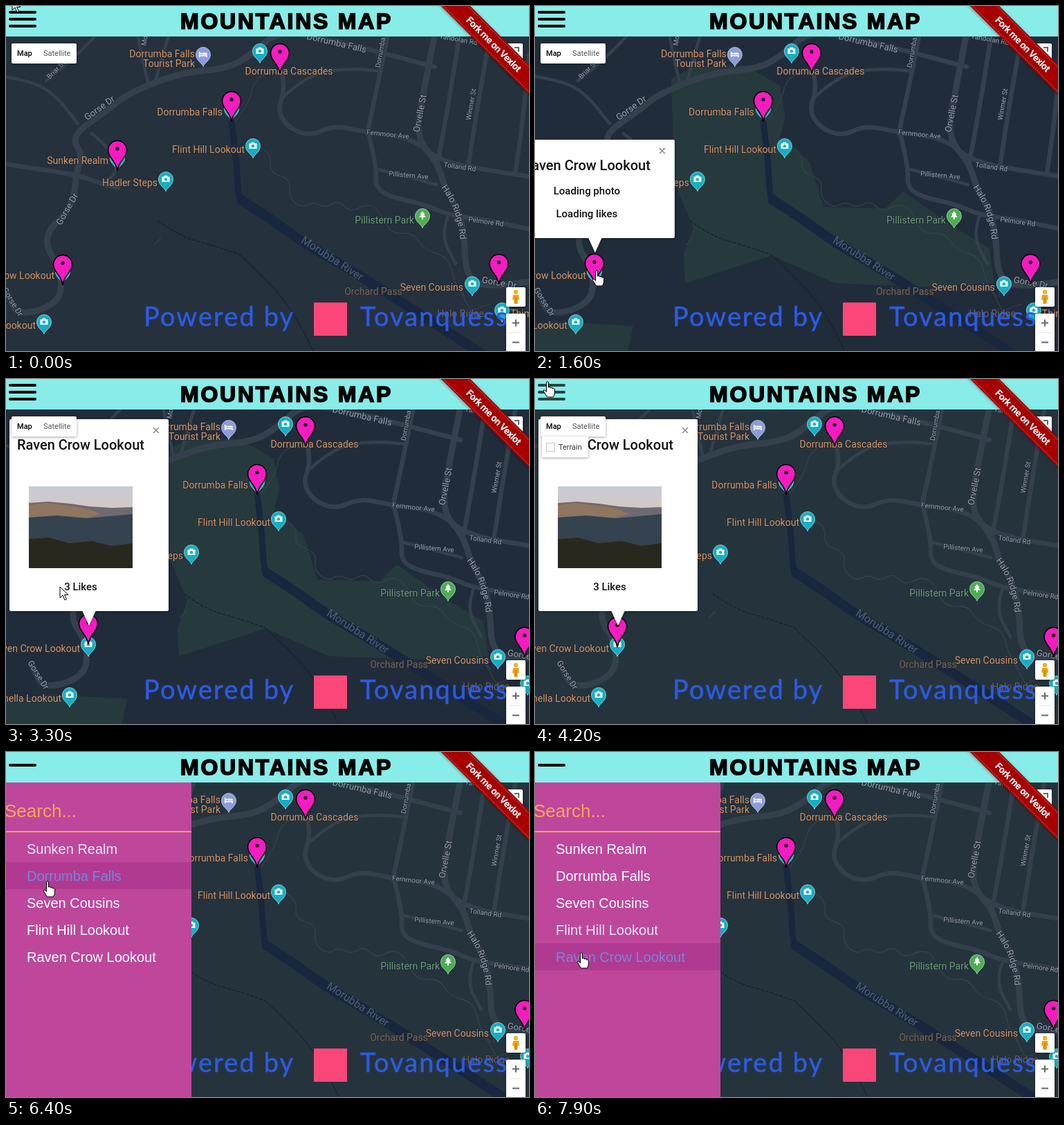
Write an HTML page that moves like this. It is 756 px wide and 498 px high and loops after 8 s.

```html
<!DOCTYPE html>
<html lang="en">
<head>
<meta charset="utf-8">
<title>Mountains Map</title>
<style>
  html, body { margin: 0; width: 100%; height: 100%; overflow: hidden; background: #25313d; }
  svg { display: block; width: 756px; height: 498px; font-family: Roboto, "Noto Sans", sans-serif; }
  .arial { font-family: "Liberation Sans", Arial, sans-serif; }
  .road { fill: none; stroke: #35404d; stroke-linecap: round; stroke-linejoin: round; }
  .halo text { paint-order: stroke; stroke: #222c39; stroke-width: 2px; stroke-linejoin: round; }
  .shadow { filter: drop-shadow(0 1px 2px rgba(0, 0, 0, .35)); }
</style>
</head>
<body>
<svg id="stage" viewBox="0 0 756 498"></svg>
<script>
const LOOP = 8000, STEP = 100, PAN = 37;
const POI = '#d59563', TEAL = '#12b0c6', PINK = '#f41cc0';

const clamp = v => Math.max(0, Math.min(1, v));
const ease = v => { v = clamp(v); return v * v * (3 - 2 * v); };

// Smooth path through "x,y x,y ..." points.
function curve(str) {
  const p = str.split(' ').map(s => s.split(',').map(Number));
  let d = `M${p[0]}`;
  for (let i = 1; i < p.length - 1; i++) {
    const mid = [0, 1].map(k => (p[i][k] + p[i + 1][k]) / 2);
    d += `Q${p[i]} ${mid}`;
  }
  return d + `L${p[p.length - 1]}`;
}

const text = (s, x, y, size, fill, extra = '') =>
  `<text x="${x}" y="${y}" font-size="${size}" fill="${fill}" ${extra}>${s}</text>`;
const END = 'text-anchor="end"', MIDDLE = 'text-anchor="middle"';
const box = (x, y, w, h, fill, extra = '') =>
  `<rect x="${x}" y="${y}" width="${w}" height="${h}" fill="${fill}" ${extra}/>`;
const street = (s, x, y, angle, size, fill = '#9aa2ae') =>
  text(s, 0, size * .36, size, fill, `${MIDDLE} transform="translate(${x} ${y}) rotate(${angle})"`);
const roads = (width, list) =>
  list.map(r => `<path class="road" stroke-width="${width}" d="${curve(r)}"/>`).join('');

const GLYPH = {
  camera: c => `<path d="M-5.5-3.5h2.5l1-1.8h4l1 1.8h2.5v7.5h-11z" fill="#fff"/><circle r="2.3" cy=".3" fill="${c}"/>`,
  bed: c => `<path d="M-6-4h1.5v5h10.5v3h-1.5v-1.5h-9V4H-6zM-1-2.5h5q2 0 2 2.8h-7z" fill="#fff"/><circle cx="-2.8" cy="-1.2" r="1.4" fill="#fff"/>`,
  tree: c => `<path d="M0-7L3.6-2H2l3 4H1v3h-2v-3h-4l3-4h-1.6z" fill="#fff"/>`
};
const poi = (x, y, fill = TEAL, glyph = 'camera') =>
  `<g transform="translate(${x} ${y})"><path d="M0 15.500C-1.500 10-10.500 7-10.500-2A10.500 10.500 0 1 1 10.500-2C10.500 7 1.500 10 0 15.500Z"
    fill="${fill}" stroke="#b9d3da" stroke-width=".8"/><g transform="translate(0 -2)">${GLYPH[glyph](fill)}</g></g>`;
const pin = (x, y, id = '') =>
  `<g ${id} transform="translate(${x} ${y})"><path d="M0 0C-2-16-13.500-18-13.500-30A13.500 13.500 0 1 1 13.500-30C13.500-18 2-16 0 0Z"
    fill="${PINK}" stroke="#000" stroke-width="1.600"/><circle cy="-32" r="2.600"/></g>`;

const park = `<g id="park" fill="#263a3d">
  <path d="M193 105L225 88 300 86 350 115 358 160 350 190 393 225 413 290 503 292 528 268 603 320 653 350 660 400 560 405 430 400 338 360 213 400 211 360 225 320 198 255Z"/>
  <path d="M-40 466L23 455 138 462 130 498H-40Z"/></g>`;

const roadLayer =
  roads(9, [
    '0,412 8,430 18,444 50,440 76,424 81,400 76,375 58,348 62,322 84,303 98,278 102,240 110,214 98,196 106,178 148,150 168,132 210,112 258,96 320,90 352,72 384,44',
    '620,40 604,120 592,190 624,226 634,262 656,300 663,340 665,388 690,406 756,398'
  ]) +
  roads(6.5, [
    '0,228 50,236 104,244 142,258 162,262',
    '352,72 380,40 440,42 530,64 620,88',
    '398,92 404,120 392,150 408,176 440,188 474,172 520,182 586,190 628,224 690,236 756,246',
    '524,184 536,232 534,262 556,276 604,286 640,302 690,308 756,322',
    '700,40 684,130 668,232', '656,40 640,140 624,226', '756,70 748,160 736,242',
    '552,40 536,120 522,184'
  ]) +
  roads(4.5, [
    '132,40 100,74 58,108', '190,40 198,80 206,114', '-40,96 20,104 66,122 104,170', '236,40 226,72 216,108',
    '124,184 152,206 162,240 140,256', '538,236 580,246 622,258', '402,130 440,96 500,90 540,94',
    '640,300 628,330 650,372'
  ]) +
  `<g fill="none"><g stroke="#33424c" stroke-width="1.300">
    <path d="${curve('330,168 352,140 358,108 384,92')}"/>
    <path d="${curve('368,204 384,214 380,240 412,250 408,276 428,292 444,282 462,292 480,280 498,298 520,286 538,292 556,330 588,326 604,352 640,362 648,400 664,420')}"/>
    <path d="M214 345L224 335M665 345L668 420M650 400L672 440 700 430"/></g>
  <path d="${curve('326,165 329,190 333,225 335,262 338,282')}" stroke="#18273d" stroke-width="9"/>
  <path d="${curve('337,278 378,304 430,342 490,376 550,414 620,458 690,504')}" stroke="#18273d" stroke-width="14"/>
  <path d="${curve('220,310 250,332 300,346 338,359')}" stroke="#17212d" stroke-width="1.400" stroke-dasharray="5 2"/>
  <path d="${curve('338,359 360,380 392,412 420,450 444,498')}" stroke="#19242f" stroke-width="1.300"/></g>`;

const streetLabels = '<g class="halo">' + [
  ['Gorse Dr', 135, 147, -36, 13], ['Gorse Dr', 88, 293, -60, 13], ['Gorse Dr', 10, 427, 58, 12], ['Gorse Dr', 713, 399, 10, 13],
  ['Dorrumba Falls', 478, 53, 13, 13], ['Orvelle St', 598, 155, -79, 13], ['Winmer St', 672, 142, -80, 10],
  ['Dorrumba', 541, 67, -80, 10], ['Fernmoor Ave', 552, 185, 6, 10], ['Pillistern Ave', 582, 244, 5, 10],
  ['Tolland Rd', 656, 232, 8, 10], ['Pelmore Rd', 694, 311, 8, 10], ['Yandolan Rd', 654, 48, 10, 10],
  ['Briar St', 72, 92, -45, 10], ['Mo', 200, 50, -80, 10]
].map(a => street(...a)).join('') +
  `<path id="bend" d="M629 262Q654 294 657 345" fill="none"/>
   <text font-size="13" fill="#9aa2ae"><textPath href="#bend">Halo Ridge Rd</textPath></text></g>` +
  street('Morubba River', 472, 364, 33, 16, '#515f75');

const poiLayer = poi(285, 72, '#8f9bdc', 'bed') + poi(367, 67) + poi(326, 150) + poi(357, 204) + poi(161, 221) +
  poi(231, 252) + poi(602, 305, '#4caf50', 'tree') + poi(674, 403) + poi(82, 385) + poi(55, 458) + poi(717, 441) +
  '<g class="halo">' + [
    ['Dorrumba Falls', 273, 74], ['Tourist Park', 273, 88], ['Dorrumba Falls', 313, 158], ['Flint Hill Lookout', 345, 212],
    ['Sunken Realm', 148, 228], ['Hadler Steps', 219, 260], ['Seven Cousins', 661, 411],
    ['Raven Crow Lookout', 70, 394], ['Manella Lookout', 43, 466]
  ].map(([s, x, y]) => text(s, x, y, 14, POI, END)).join('') +
  text('Dorrumba Cascades', 409, 99, 14, POI, MIDDLE) + text('Pillistern Park', 590, 314, 14, '#6b9a76', END) +
  text('Orchard Pass', 531, 417, 14, '#7b6453', MIDDLE) + text('Halo Ridge', 691, 449, 14, '#75604f', END) +
  text('Thimble', 729, 449, 14, POI) + '</g>';

const pins = pin(396, 98) + pin(326, 167) + pin(161, 238) + pin(712.5, 402) + pin(82, 403, 'id="hopper"');

const brand = `<g font-family="Lato, sans-serif" font-size="38" fill="#2d5be3" stroke="#2d5be3" stroke-width=".5" letter-spacing="2.100">
  <text x="199" y="462">Powered by</text><text x="512" y="462">Tovanquess</text></g>` + box(445, 428, 48, 48, '#fa4778');

const photo = `<defs><linearGradient id="sky" x2="0" y2="1"><stop stop-color="#c6ccd8"/><stop offset="1" stop-color="#d9c6bd"/></linearGradient></defs>
  <g transform="translate(33 155)">${box(0, 0, 150, 40, 'url(#sky)')}
  <path d="M0 24L28 22 60 25 88 29 120 31 150 30V118H0Z" fill="#6e6a70"/>
  <path d="M0 27L24 24 52 27 84 32 104 40 80 46 40 42 0 47Z" fill="#8f7660"/>
  <path d="M0 45L40 42 84 46 150 40V118H0Z" fill="#34434f"/>
  <path d="M0 76L30 74 58 82 92 79 120 86 150 82V118H0Z" fill="#29281e"/></g>`;

const popup = `<g id="popup"><g class="shadow"><rect id="card" x="5" width="230" fill="#fff" rx="2"/>
  <path d="M110 334h20l-10 22z" fill="#fff"/></g>
  <g id="cardTop"><path d="M213 12l8 8m0-8l-8 8" stroke="#8b8b8b" stroke-width="1.600"/>
  ${text('Raven Crow Lookout', 108, 44, 20, '#111', MIDDLE + ' font-weight="500"')}</g>
  <g id="loading" font-weight="500">${text('Loading photo', 108, 272, 15, '#111', MIDDLE)}${text('Loading likes', 108, 305, 15, '#111', MIDDLE)}</g>
  <g id="loaded">${photo}${text('3 Likes', 108, 305, 15, '#111', MIDDLE + ' font-weight="500"')}</g></g>`;

const controls = `<g class="shadow">${box(8, 54, 94, 29, '#fff', 'rx="2"')}${box(719, 54, 28, 28, '#fff', 'rx="2"')}
  ${box(723, 406, 28, 28, '#fff', 'rx="2"')}${box(723, 444, 28, 56, '#fff', 'rx="2"')}</g>` +
  text('Map', 16, 72, 11, '#000', 'font-weight="500"') + text('Satellite', 54, 72, 11, '#565656') +
  `<g id="terrain">${box(10, 83, 67, 30, '#fff', 'class="shadow"')}${box(16.5, 92.5, 12, 12, '#fff', 'stroke="#c6c6c6"')}${text('Terrain', 34, 102, 11, '#333')}</g>
  <path d="M735 60h6v6" fill="none" stroke="#666" stroke-width="2"/>
  <path d="M732 457.500h10M737 452.500v10M732 485.500h10" stroke="#666" stroke-width="2"/>${box(728, 471, 18, 1, '#e6e6e6')}
  <circle cx="737" cy="413" r="3.200" fill="#f5b324"/><path d="M733 417h8l1 7h-2l-.6 6h-4.800l-.6-6h-2z" fill="#f0a30f"/>
  <path d="M737 420v9" stroke="#a86f12"/>`;

const ITEMS = ['Sunken Realm', 'Dorrumba Falls', 'Seven Cousins', 'Flint Hill Lookout', 'Raven Crow Lookout'];
const ROW = 39, LIST_TOP = 121;
const sidebar = `<g id="sidebar" class="arial">${box(0, 44, 268, 454, '#be479b')}
  ${text('Search...', -2, 94, 26, '#fba55b')}${box(0, 114, 268, 2, '#fba55b')}
  ${box(0, 0, 268, ROW, '#b03a92', 'id="hover"')}
  ${ITEMS.map((s, i) => text(s, 30, LIST_TOP + 26 + i * ROW, 20, '#fff', 'class="item"')).join('')}</g>`;

const header = box(0, 0, 756, 44, '#88ece8') +
  `<g id="bars">${[7, 17, 27].map(y => box(4, y, 40, 4, '#000', 'rx="2" class="bar"')).join('')}</g>` +
  `<text class="arial" x="252" y="33" font-size="32" font-weight="bold" letter-spacing="2.750" stroke="#000" stroke-width="1.700">MOUNTAINS MAP</text>`;

const ribbon = `<g transform="translate(705 55) rotate(45)">${box(-130, -15, 260, 30, '#a60000', 'class="shadow"')}
  <path d="M-130-12.500h260M-130 12.500h260" stroke="#d98c8c" stroke-dasharray="2 1.500" stroke-width=".8"/>
  ${text('Fork me on Vexlot', 0, 5, 14, '#fff', MIDDLE + ' font-weight="bold" letter-spacing="-.5"')}</g>`;

const tooltip = `<g id="tooltip">${box(90.5, 407.5, 118, 17, '#fff', 'stroke="#999"')}
  ${text('Raven Crow Lookout', 149.5, 420, 11.5, '#222', MIDDLE + ' font-family="Open Sans, sans-serif"')}</g>`;

const CURSORS = {
  arrow: 'M0 0V16l4-4 3 7 2.500-1-3-6.500h5.500z',
  hand: 'M-1.500.5q1.500-1.500 3 0V8q1.500-1 3 0v1q1.500-1 3 0v1q2-1 3 1v6l-2 5h-9l-5-8q-1-3 1.500-2l2.500 2.500z',
  grab: 'M-3 8L-7 1q-1-2 1-2l2 2-1-6q1-2 2 0l1 4v-6q1.500-1.500 2.500 0v6l1-5q1.500-1 2 0v6l1-4q1.500-1 2 .5l-1.500 6.500-2 5z'
};

document.getElementById('stage').innerHTML = `<rect id="land" width="756" height="498"/>
  <g id="map">${park}${roadLayer}${streetLabels}${poiLayer}${pins}</g>
  ${brand}${popup}${controls}${sidebar}${header}${ribbon}${tooltip}
  <path id="cursor" fill="#fff" stroke="#000" stroke-linejoin="round"/>`;

const ui = {};
document.querySelectorAll('[id]').forEach(e => ui[e.id] = e);
const items = [...document.querySelectorAll('.item')], bars = [...document.querySelectorAll('.bar')];

// Time, x, y and the pointer shape from that time on.
const TRACK = [
  [0, 9, -10, 'arrow'], [200, 18, 60, 'grab'], [700, 89, 382, 'hand'], [1600, 89, 382, 'hand'], [1900, 90, 385, 'grab'],
  [3000, 90, 385, 'grab'], [3200, 82, 330, 'arrow'], [3300, 78, 300, 'arrow'], [3500, 78, 300, 'arrow'],
  [3900, 32, 72, 'hand'], [4200, 18, 4, 'hand'], [4700, 20, 6, 'hand'], [5000, 46, 57, 'hand'], [5400, 52, 108, 'hand'],
  [5700, 55, 132, 'hand'], [6100, 58, 156, 'hand'], [6200, 59, 166, 'hand'], [6400, 60, 187, 'hand'],
  [6800, 62, 210, 'hand'], [7200, 64, 236, 'hand'], [7600, 66, 270, 'hand'], [7700, 67, 280, 'hand'], [7900, 67, 290, 'hand']
];

function pointer(t) {
  let i = TRACK.length - 1;
  while (i > 0 && TRACK[i][0] > t) i--;
  const a = TRACK[i], b = TRACK[i + 1] || a;
  const k = b === a ? 0 : (t - a[0]) / (b[0] - a[0]);
  return { x: a[1] + (b[1] - a[1]) * k, y: a[2] + (b[2] - a[2]) * k, shape: a[3] };
}

const rowAt = t => t < 5000 ? -1 : Math.floor((pointer(t).y - LIST_TOP) / ROW);
const show = (e, on) => e.setAttribute('visibility', on ? 'visible' : 'hidden');
const move = (e, x, y) => e.setAttribute('transform', `translate(${x} ${y})`);
const mix = (a, b, k) => `rgb(${a.map((v, i) => Math.round(v + (b[i] - v) * k))})`;

function draw(t) {
  const green = t >= 1600 && t < 3500;
  ui.land.setAttribute('fill', green ? '#212c3b' : t < 1600 ? '#25313d' : '#25343c');
  show(ui.park, green);

  const pan = PAN * ease((t - 1500) / 500);
  move(ui.map, pan, 0);
  const phase = t < 1587 ? 0 : (t - 1587) % 700 / 700;
  move(ui.hopper, 82, 403 - 20 * (1 - (2 * phase - 1) ** 2));

  const ready = t >= 2700, top = ready ? 58 : 193, open = t >= 1600;
  move(ui.popup, pan - PAN, 0);
  ui.popup.style.display = open ? '' : 'none';
  ui.card.setAttribute('y', top);
  ui.card.setAttribute('height', 335 - top);
  move(ui.cardTop, 0, top);
  show(ui.loading, !ready);
  show(ui.loaded, ready);
  show(ui.terrain, t >= 3900);

  const slide = ease((t - 4400) / 400);
  move(ui.sidebar, -268 * (1 - slide), 0);
  bars[0].setAttribute('opacity', 1 - slide);
  bars[2].setAttribute('opacity', 1 - slide);
  const dim = clamp((t - 3900) / 300) - clamp((t - 4900) / 400);
  ui.bars.setAttribute('opacity', 1 - .3 * dim);

  const row = rowAt(t);
  show(ui.hover, row >= 0);
  ui.hover.setAttribute('y', LIST_TOP - 1 + row * ROW);
  // Hover colour fades over the last four steps.
  items.forEach((e, i) => {
    let k = 0;
    for (let n = 0; n < 4; n++) k += rowAt(t - n * STEP) === i ? .25 : 0;
    e.setAttribute('fill', mix([255, 255, 255], [95, 110, 212], ease(k)));
  });

  show(ui.tooltip, t >= 1200 && t < 1600);
  ui.tooltip.setAttribute('opacity', Math.min(1, .4 + (t - 1200) / 350));

  const p = pointer(t);
  ui.cursor.setAttribute('d', CURSORS[p.shape]);
  move(ui.cursor, p.x, p.y);
}

const start = performance.now();
function tick() {
  const t = (performance.now() - start) % LOOP;
  draw(Math.floor(t / STEP) * STEP);
  requestAnimationFrame(tick);
}
tick();
</script>
</body>
</html>
```
